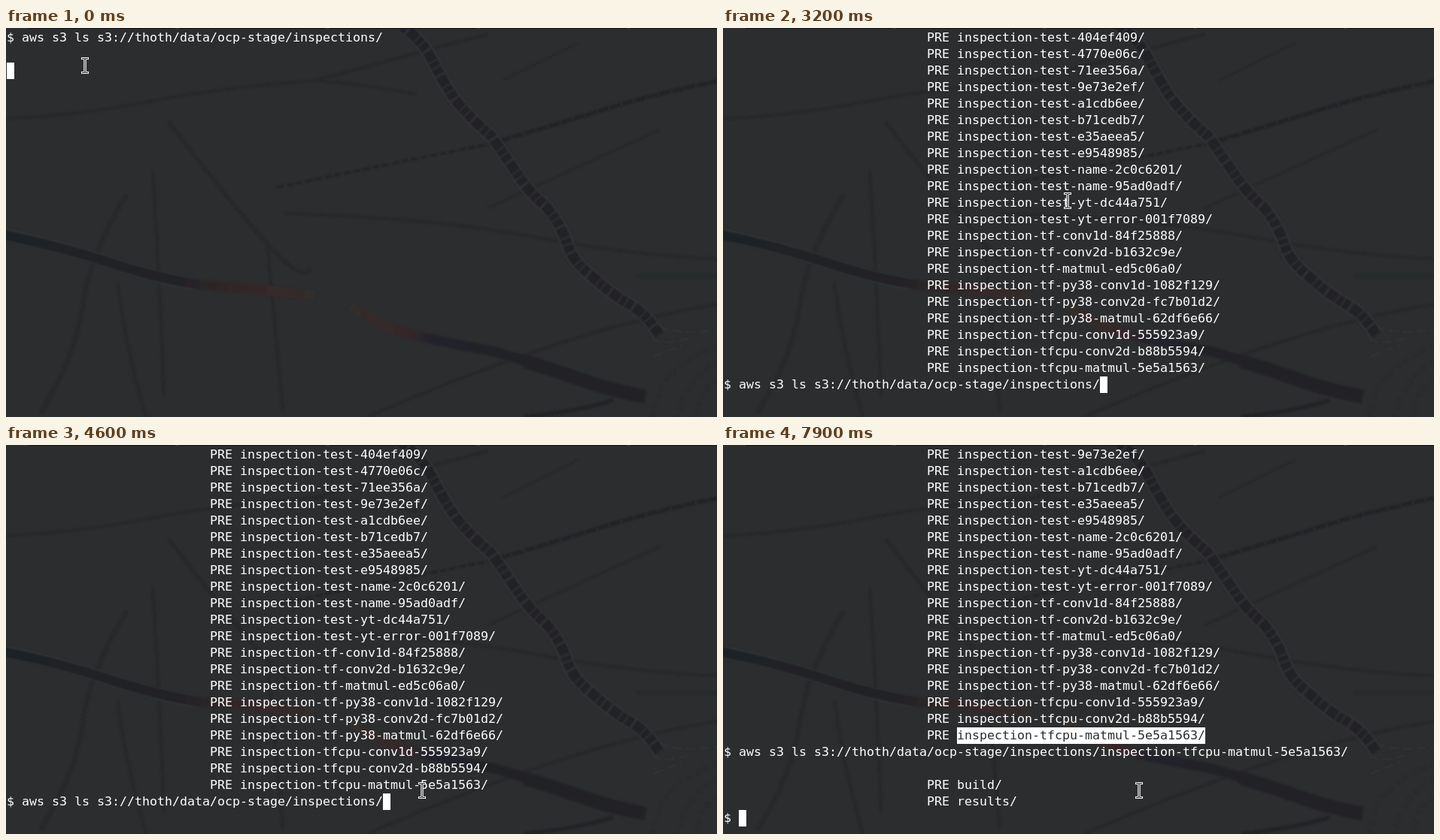
Recreate the animation shown at these times as an HTML page. Size 945 by 518 pixels, loop 8000 ms.

```html
<!DOCTYPE html>
<html lang="en">
<head>
<meta charset="utf-8">
<title>Terminal session</title>
<style>
  html, body { margin: 0; width: 100%; height: 100%; overflow: hidden; background: #2b2d2e; }
  svg, pre { position: absolute; left: 0; top: 0; }
  pre {
    left: 1px; top: 2px; margin: 0; color: #fff;
    font: 16.61px/22px "DejaVu Sans Mono", monospace;
    font-variant-ligatures: none;
  }
  b {
    display: inline-block; height: 22px; vertical-align: top;
    font-weight: normal; background: #fff; color: #2b2d2e;
  }
  b.line { width: 944px; }
  #scene path { fill: none; stroke-linejoin: round; }
  #scene .solid { stroke: none; }
</style>
</head>
<body>
<svg id="scene" width="945" height="518">
  <defs>
    <filter id="soft" x="-20%" y="-20%" width="140%" height="140%"><feGaussianBlur stdDeviation="1.1"/></filter>
    <filter id="haze" x="-60%" y="-60%" width="220%" height="220%"><feGaussianBlur stdDeviation="4"/></filter>
    <linearGradient id="leftTip" gradientUnits="userSpaceOnUse" x1="0" y1="0" x2="412" y2="0">
      <stop offset="0" stop-color="#1f2127"/><stop offset=".55" stop-color="#222328"/>
      <stop offset=".72" stop-color="#302728"/><stop offset=".86" stop-color="#38292a"/>
      <stop offset="1" stop-color="#302e2d"/>
    </linearGradient>
    <linearGradient id="rightTip" gradientUnits="userSpaceOnUse" x1="455" y1="0" x2="640" y2="0">
      <stop offset="0" stop-color="#312e2d"/><stop offset=".2" stop-color="#352b2b"/>
      <stop offset=".42" stop-color="#35272a"/><stop offset=".6" stop-color="#23232a"/>
      <stop offset="1" stop-color="#202128"/>
    </linearGradient>
    <path id="dendrite" d="M524-4Q552 14 566 42T596 94Q620 124 645 144Q663 170 680 195Q698 222 718 238Q738 262 746 288Q754 312 778 330Q806 356 832 370Q852 382 868 408"/>
  </defs>

  <!-- distant fibres -->
  <g filter="url(#soft)" stroke="#262829" stroke-width="3">
    <path d="M0 121Q100 116 190 98T410 70Q470 74 545 88M410 70L640 8"/>
    <path d="M216 125Q300 235 348 288T404 320M347 285L368 510"/>
    <path d="M160 222Q112 300 102 370T46 512" stroke-width="5"/>
    <path d="M148 340Q160 430 186 518M195 190Q204 330 210 490"/>
    <path d="M370 247Q560 252 700 278T945 307"/>
    <path d="M480 518Q600 465 720 425T945 368M840 330H945"/>
    <path d="M660 70L760 20M640 240L870 135" stroke-width="2"/>
  </g>
  <g filter="url(#haze)">
    <path class="solid" fill="#39302a" d="M188 60L202 82L222 94L207 108L216 128L194 118L176 132L182 108L148 96L180 88Z"/>
    <path class="solid" fill="#342e2a" d="M148 28L158 44L174 52L156 60L140 66L146 48Z"/>
    <path class="solid" fill="#202429" d="M806 115L826 110L840 98L848 114L862 122L842 126L826 136L822 122Z"/>
  </g>

  <!-- beaded thread -->
  <g filter="url(#soft)" stroke="#212227">
    <path d="M360 212Q500 183 640 155" stroke-width="3" stroke-dasharray="9 4"/>
    <path d="M640 155Q720 132 790 110T945 71" stroke-width="5" stroke-dasharray="15 2"/>
  </g>

  <!-- cell body -->
  <g filter="url(#soft)">
    <path class="solid" fill="#27292c" d="M850 378Q872 402 945 400V518H822Q806 494 772 482L740 460Q815 470 840 448Q862 425 850 378Z"/>
    <path class="solid" fill="#202228" d="M945 412Q906 428 886 452Q850 474 770 462L778 488Q818 494 832 518H945Z"/>
    <path stroke="#2a2c2f" stroke-width="5" stroke-dasharray="4 9 7 6" d="M945 425Q900 440 872 474L858 518M945 446Q908 460 892 518M945 470Q922 480 918 518"/>
    <path stroke="#333537" stroke-width="2" stroke-dasharray="14 5" d="M852 384Q872 412 945 402M858 412Q870 425 912 412M860 438Q880 430 900 422"/>
    <path stroke="#212328" stroke-width="5" d="M690 518Q760 510 806 496"/>
  </g>

  <!-- axons -->
  <g filter="url(#soft)">
    <path stroke="#323436" stroke-width="16" d="M0 275Q70 290 140 313T250 341"/>
    <path stroke="url(#leftTip)" stroke-width="13" d="M-4 275Q70 290 140 313T260 342Q330 347 410 356"/>
    <path stroke="url(#rightTip)" stroke-width="13" d="M458 370Q500 400 550 411T650 431Q704 446 755 468"/>
    <path stroke="#202128" stroke-width="18" d="M690 444Q740 459 770 470T850 491"/>
    <use href="#dendrite" stroke="#343638" stroke-width="18"/>
    <use href="#dendrite" stroke="#202127" stroke-width="14"/>
    <use href="#dendrite" stroke="#303234" stroke-width="13" stroke-dasharray="2 9 3 14 2 7"/>
  </g>
  <path stroke="#111213" d="M30 .5H945" stroke-dasharray="195 5"/>
</svg>
<pre id="screen"></pre>
<svg id="pointer" width="24" height="28" viewBox="-12 -14 24 28">
  <g fill="none" stroke-linecap="square">
    <path id="beam" d="M-3.5-9.5H-1.5L0-8.5L1.5-9.5H3.5M0-8.5V8.5M-3.5 9.5H-1.5L0 8.5L1.5 9.5H3.5" stroke="#fff" stroke-width="3"/>
    <use href="#beam"/>
    <path d="M-3.5-9.5H-1.5L0-8.5L1.5-9.5H3.5M0-8.5V8.5M-3.5 9.5H-1.5L0 8.5L1.5 9.5H3.5" stroke="#1c1d1e" stroke-width="1.1"/>
  </g>
</svg>
<script>
const LOOP = 8000;
const screenEl = document.getElementById('screen');
const pointerEl = document.getElementById('pointer');

const mark = (text, cls = '') => `<b class="${cls}">${text}</b>`;
const entry = name => ' '.repeat(27) + 'PRE ' + name;
const cursor = mark(' ');
const command = '$ aws s3 ls s3://thoth/data/ocp-stage/inspections/';

const names = `test-3b82d6f1 test-404ef409 test-4770e06c test-71ee356a test-9e73e2ef
  test-a1cdb6ee test-b71cedb7 test-e35aeea5 test-e9548985 test-name-2c0c6201
  test-name-95ad0adf test-yt-dc44a751 test-yt-error-001f7089 tf-conv1d-84f25888
  tf-conv2d-b1632c9e tf-matmul-ed5c06a0 tf-py38-conv1d-1082f129 tf-py38-conv2d-fc7b01d2
  tf-py38-matmul-62df6e66 tfcpu-conv1d-555923a9 tfcpu-conv2d-b88b5594 tfcpu-matmul-5e5a1563`
  .split(/\s+/).map(name => `inspection-${name}/`);
const picked = names.at(-1);
const rows = names.slice(0, -1).map(entry);

const plain = entry(picked);
const word = entry(mark(picked));
const line = mark(plain, 'line');

const listing = (last, input = cursor) => [...rows.slice(1), last, command + input];
const scrolled = (skip, ...tail) => [...rows.slice(skip), word, command + picked, '', ...tail];
const results = [entry('build/'), entry('results/')];

const screens = [
  [0, [command, '', cursor]],
  [600, [...rows, plain, '$ ' + cursor]],
  [1500, listing(plain)],
  [4000, listing(word)],
  [4300, listing(line)],
  [4600, listing(plain)],
  [4900, listing(word)],
  [5200, listing(word, mark(picked + ' '))],
  [6900, scrolled(2, cursor)],
  [7800, scrolled(4, ...results, cursor)],
  [7900, scrolled(4, ...results, '$ ' + cursor)],
];

const pointerStops = [
  [0, [105, 50]],
  [3200, [458, 230]],
  [3300, [512, 345]],
  [3400, [548, 430]],
  [3500, [570, 477]],
  [3600, [575, 487]],
  [3700, [562, 470]],
  [3800, [553, 460]],
];

const at = (steps, time) => steps.findLast(([start]) => start <= time)[1];

let shown;
function draw(now) {
  const time = now % LOOP;
  const content = at(screens, time);
  if (content !== shown) {
    screenEl.innerHTML = content.join('\n');
    shown = content;
  }
  const [x, y] = at(pointerStops, time);
  pointerEl.style.transform = `translate(${x - 12}px, ${y - 14}px)`;
}

const begin = performance.now();
function tick() {
  draw(performance.now() - begin);
  requestAnimationFrame(tick);
}
tick();
</script>
</body>
</html>
```
